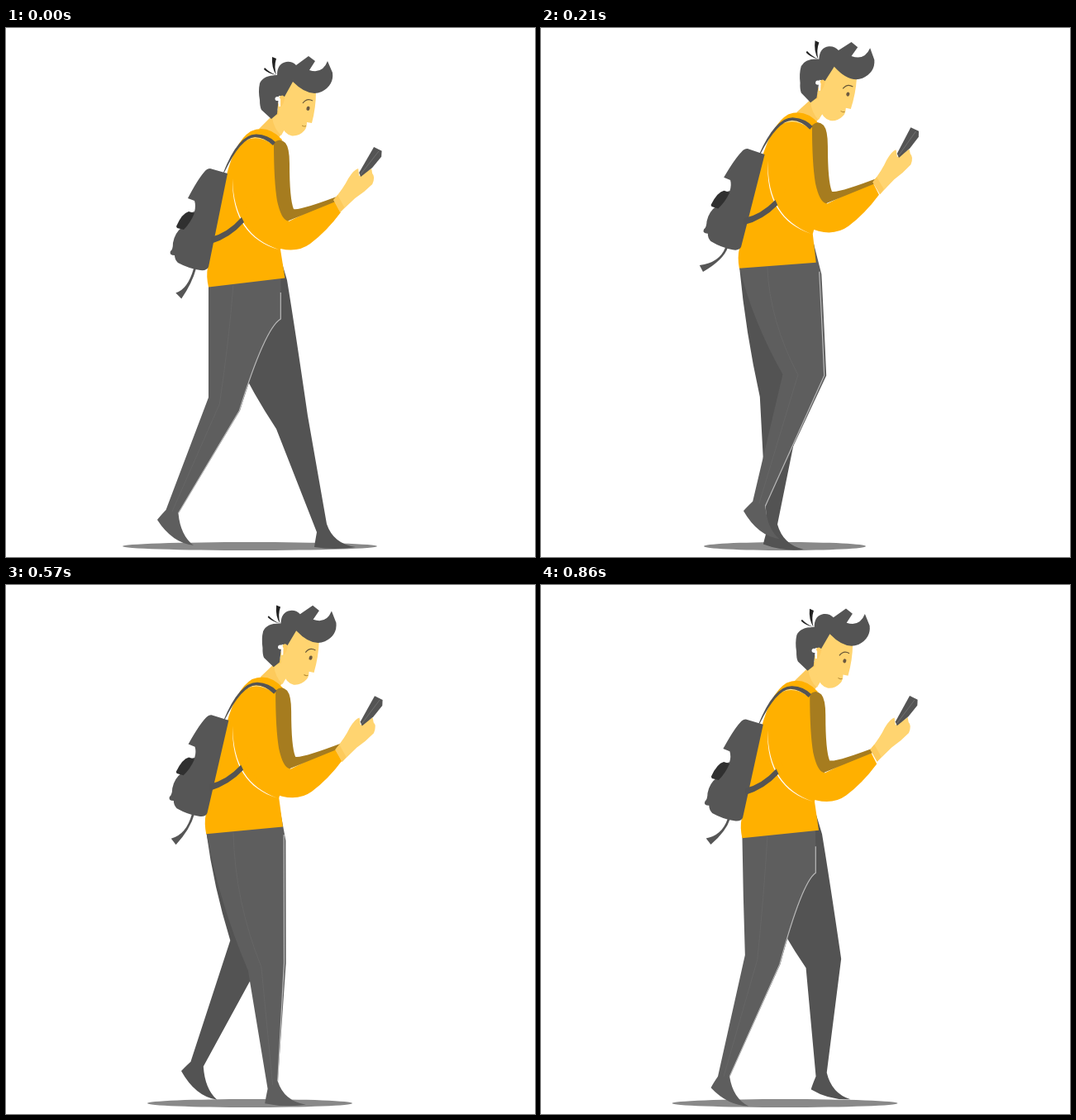
An HTML page with a canvas that plays this animation: 640x640 px, repeating every 0.93 s.

```html
<!DOCTYPE html>
<html lang="en">
<head>
<meta charset="utf-8">
<title>Walking with a phone</title>
<style>
  html, body { margin: 0; width: 100%; height: 100%; overflow: hidden; background: #fff; }
  canvas { display: block; width: 640px; height: 640px; }
</style>
</head>
<body>
<canvas id="stage" width="640" height="640"></canvas>
<script>
const ctx = document.getElementById('stage').getContext('2d');
const LOOP = 930, STEP = LOOP / 13;

const ORANGE = '#ffb000', SLEEVE = '#a67c1f', SKIN = '#ffd470', NECK = '#fdca5c';
const DARK = '#545454', PACK = '#565656', PANTS = '#5e5e5e', FAR_PANTS = '#535353';

const mix = (a, b, k) => a + (b - a) * k;
const clamp = v => Math.min(1, Math.max(0, v));
const wave = time => Math.sin(time / LOOP * 2 * Math.PI);

// The body is lowest when both feet are apart, highest as the legs pass.
const riseAt = time => Math.abs(wave(time)) ** 1.5;

// Steps fall on whole hundredths of a second.
const stepTime = k => Math.round(k * STEP / 10) * 10;

function fill(color, d) {
  ctx.fillStyle = color;
  ctx.fill(new Path2D(d));
}

function stroke(color, width, d) {
  ctx.strokeStyle = color;
  ctx.lineWidth = width;
  ctx.stroke(new Path2D(d));
}

function oval(color, x, y, rx, ry, angle = 0) {
  ctx.fillStyle = color;
  ctx.beginPath();
  ctx.ellipse(x, y, rx, ry, angle, 0, Math.PI * 2);
  ctx.fill();
}

function posed(px, py, dx, dy, angle, draw) {
  ctx.save();
  ctx.translate(px + dx, py + dy);
  ctx.rotate(angle);
  ctx.translate(-px, -py);
  draw();
  ctx.restore();
}

// Phase 0 has the foot furthest back; it swings forward for half a loop, then stands.
function legPose(phase) {
  const back = Math.abs(phase / LOOP * 2 - 1);
  const sway = wave(phase), lift = Math.max(0, sway), rise = riseAt(phase);
  return {
    rise,
    knee: {
      x: 264 + 82 * (1 - back) + 18 * sway,
      y: 455 + 22 * (1 - back) - 34 * rise - 12 * sway,
      half: 19 + 7.5 * rise,
      slope: 8 * (2 * back - 1)
    },
    ankle: {
      x: 382 - 181 * back ** .78 - 5 * rise,
      y: 605 - 20 * back ** 4 - 28 * lift
    },
    tilt: back ** 2 + .8 * lift
  };
}

function drawLeg(phase, color, near) {
  const { rise, knee, ankle, tilt } = legPose(phase);
  const at = (x, y) => `${ankle.x + x},${ankle.y + y}`;

  const hipX = 245 - 5 * rise, hipY = 311 - 22 * rise;
  const backX = knee.x - knee.half, backY = knee.y - knee.slope;
  const frontX = knee.x + knee.half, frontY = knee.y + knee.slope;

  // The front of the thigh turns from a crotch fold into an outward bow.
  const bow = clamp((frontX - 300) / 50);
  const bendX = mix(333, 340, bow), bendY = mix(352, 305, bow) - 12 * rise;
  const curveX = mix(bendX, frontX, .38), curveY = mix(bendY, frontY, mix(.1, .35, bow));

  const heel = at(-9 - 9 * tilt, 23 - 13 * tilt);
  const toe = at(41 - 15 * tilt, 23 + 18 * tilt);
  const shin = at(6 + 1.5 * tilt, -5 + 7 * tilt);

  fill(color, `M${hipX},${hipY} Q${mix(hipX, backX, .3)},${mix(hipY, backY, .5)} ${backX},${backY}
    L${at(-6 - 1.5 * tilt, 5 - 7 * tilt)} Q${at(-8 - 7 * tilt, 16 - 10 * tilt)} ${heel}
    Q${at(16 - 16 * tilt, 27 + 11 * tilt)} ${toe} Q${at(14 - 4 * tilt, 19 + 10 * tilt)} ${shin}
    L${frontX},${frontY} Q${curveX},${curveY} ${bendX},${bendY}
    L${332 - 2 * rise},${278 - 17 * rise}Z`);
  if (!near) return;

  stroke('#676767', .8, `M${mix(hipX, bendX, .34)},${hipY}
    Q${mix(hipX, curveX, .36)},${mix(hipY, backY, .5)} ${mix(backX, frontX, .35)},${knee.y}
    L${at(0, 0)}`);
  const inset = .7 + 2 * bow;
  stroke('#b9b9b9', 1.2, `M${bendX - inset},${bendY - 32 * (1 - bow)} L${bendX - inset},${bendY}
    Q${curveX - inset},${curveY} ${frontX - inset},${frontY} L${shin}`);
}

function drawPack() {
  fill(PACK, `M247,170 L268,176 L254,245 L245,289 Q243,294 235,293 Q221,291 208,284
    Q204,280 204,275 Q197,275 199,270 Q202,268 202,260 Q204,248 213,241 L222,224
    L228,222 Q230,215 228,209 L220,206 Q232,183 240,174 Q243,170 247,170Z`);
  fill('#303030', 'M206,240 Q213,224 221,222 L228,224 Q223,236 215,244 L207,242Z');
}

function drawTail(rise, swing) {
  const baseX = 228 - 4 * rise, baseY = 291 - 26 * rise;
  const x = 206 - 15 * swing, y = 322 - 37 * swing;
  const x2 = 213 - 18 * swing, y2 = 329 - 36 * swing;
  fill(PACK, `M${baseX - 1},${baseY} Q${baseX - 8},${mix(baseY, y, .85)} ${x},${y}
    L${x2},${y2} Q${baseX - 3},${mix(baseY, y2, .5)} ${baseX + 2},${baseY}Z`);
}

function drawTorso() {
  fill(ORANGE, `M296,125 Q316,116 334,135 L327,150 L340,235 L332,268 L337.5,302.5 L245,313.5
    Q242,300 244,290 L248,245 L266,181 Q277,137 296,125Z`);
}

function drawStraps() {
  fill('#fff', 'M274,182 C273,230 294,258 330,268 C295,256 275,230 274,182Z');
  stroke('#ffe5a6', 1.1, 'M289,136 Q305,128 322,140');
  fill(DARK, `M262.5,176 Q281,128 303,128.5 Q317,129 326,138 L323,142
    Q312,132 301,132 Q284,133 264.5,174Z`);
  fill(DARK, 'M248,253 Q268,248 285,229 L288,235 Q271,254 248,261Z');
}

function drawForearm() {
  fill(ORANGE, `M290,220 Q300,260 332,267 Q353,272 368,261 Q388,246 405,223
    L397,207 L342,234 L326,150Z`);
  fill(SLEEVE, `M324,139 Q331,132 338,139 Q343,145 343,164 Q343,207 348,219
    Q356,221 408,201 L406,207 L341,233.5 Q333,232 328,209 Q324,185 324,139Z`);
}

function drawHand() {
  fill(SKIN, `M396,209 Q408,195 414,183 Q421,172 426,171 L427,180 L439,173 L442,171
    L443,177 Q447,181 443,190 Q433,200 422,207 L404,224Z`);
  fill(NECK, 'M396,209 L401,203 L409,218 L404,224Z');
  fill(DARK, 'M445,145 L454.5,150 L454,157 L443,170 L429,181 L427,176Z');
  stroke('#777', .8, 'M451,150 L429,178');
}

function drawNeck() {
  fill(NECK, 'M324,104 L306,122 L328,136 L338,121 L332,96Z');
  fill(SKIN, 'M322,108 Q324,122 333,130 L339,119 L331,104Z');
}

function drawHead() {
  fill(SKIN, `M346,62 L375,77 Q375,96 370,115 L364,114 Q364,121 361,124 Q355,131 346,130.5
    Q337,129 332,116 L328,94 L336,80Z`);
  fill(DARK, `M321,110 L309,99 Q307,95 307,87 Q305,76 307,67 Q311,57 328,57
    Q328,43 339,41 Q346,40 351,45 L366,34 L374,40 L367,51 Q383,56 389,40
    L395,54 Q397,69 382,77 Q366,84 347,65 L337,83 L330,82 L328,104Z`);
  fill('#ffcc61', 'M330,84 Q335,79 337,84 Q337,91 332,96Z');
  fill('#222', 'M322,35 L327,37 Q324,46 327,57 Q321,48 322,35Z');
  fill('#222', 'M313,48 Q319,54 327,57 Q317,55 312,50Z');
  oval('#fff', 328.5, 85.5, 3, 2.6);
  stroke('#fff', 2.2, 'M331,86 L331,95');
  stroke('#675637', 1.2, 'M359,91 Q364,84 371,88');
  oval('#6b5940', 365.5, 97.3, 2, 2.6, .3);
  stroke('#b58b35', 1, 'M358,118 Q361,120 363,118.5');
}

function drawScene(time) {
  const rise = riseAt(time), trail = riseAt(time - 18);
  const body = draw => posed(300, 240, -2 * rise, -20.7 * rise, .045 * rise, draw);

  ctx.fillStyle = '#fff';
  ctx.fillRect(0, 0, 640, 640);
  oval('#898989', 295, 627, 154 - 57 * rise, 5);

  drawLeg((time + LOOP / 2) % LOOP, FAR_PANTS, false);
  drawLeg(time, PANTS, true);
  drawTail(rise, trail);
  body(drawNeck);
  body(drawTorso);
  posed(235, 230, 0, -25 * rise, .05 * rise, drawPack);
  posed(0, 0, 4 * rise, -21.5 * rise, 0, drawForearm);
  posed(400, 215, 6 * trail, -24 * trail, -.05 * trail, drawHand);
  body(drawStraps);
  posed(347, 130, 4 * rise, -18.7 * rise, .06 * rise, drawHead);
}

const start = performance.now();
let shown = -1;

function tick() {
  const time = (performance.now() - start) % LOOP;
  let step = Math.round(time / STEP);
  if (stepTime(step) > time) step--;
  if (step !== shown) drawScene(stepTime(shown = step));
  requestAnimationFrame(tick);
}
tick();
</script>
</body>
</html>
```
